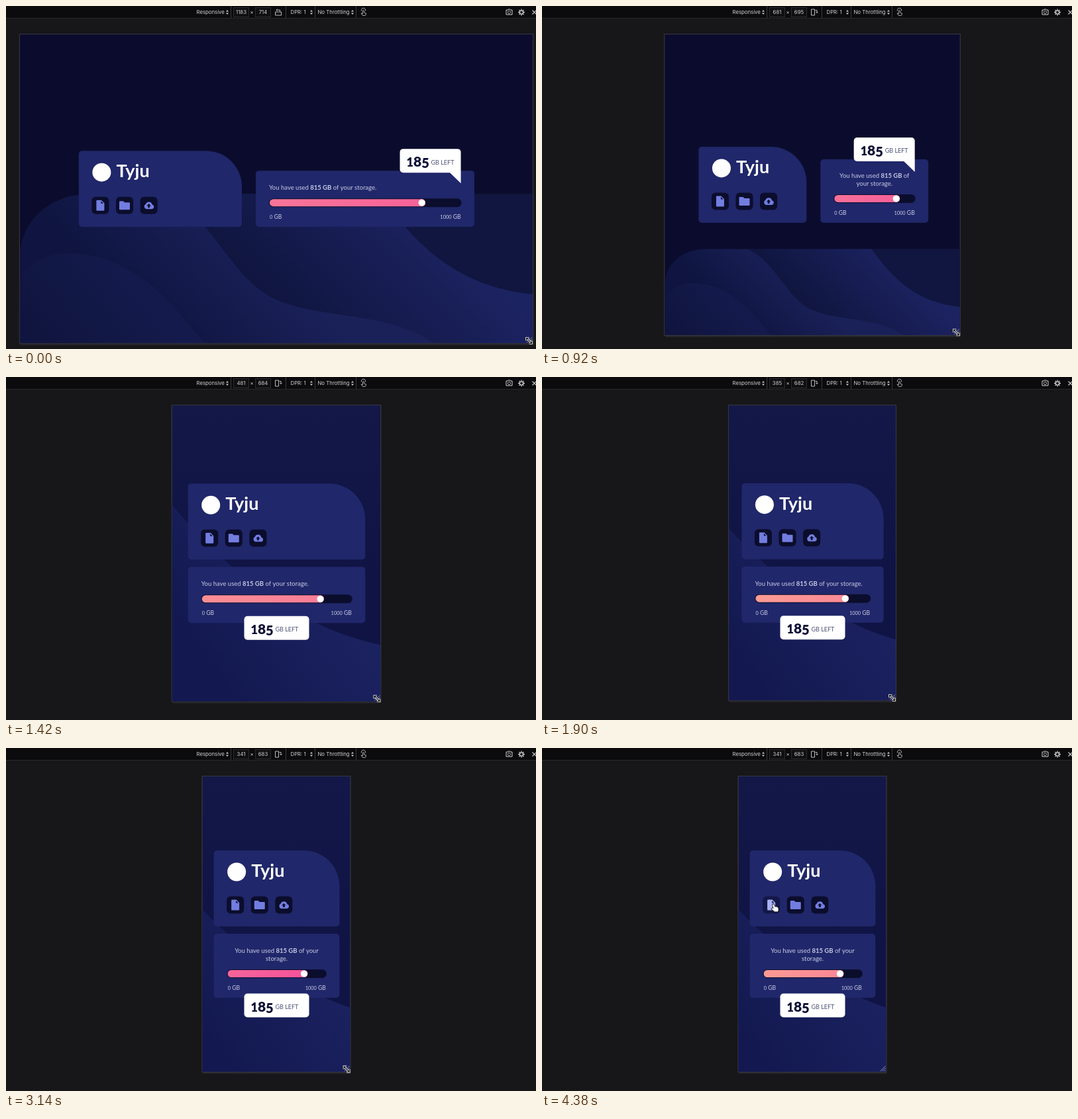
These frames come from a looping animation (800x519 px, 4.4 s). An HTML page with a canvas:

```html
<!DOCTYPE html>
<html lang="en">
<head>
<meta charset="utf-8">
<title>Responsive storage page</title>
<style>
html, body { margin: 0; height: 100%; overflow: hidden; background: #17171a; }
canvas { display: block; }
</style>
</head>
<body>
<canvas id="stage" width="800" height="519"></canvas>
<script>
const c = document.getElementById('stage').getContext('2d');
const LOOP = 4400, SCALE = 0.6545, CENTER = 408, TOP = 43;
const LATO = 'Lato, sans-serif', UI = '7.8px Inter, sans-serif';
const NAVY = '#0b0d2c', CARD = '#20276a', PALE = '#c9cce6', GREY = '#d0d0d4';

// time, viewport width, viewport height
const SIZES = [
  [0, 1183, 714], [60, 1183, 714], [460, 1013, 709], [560, 1013, 709],
  [920, 681, 695], [1080, 648, 692], [1420, 481, 684], [1640, 440, 683],
  [1900, 385, 682], [2180, 398, 682], [2720, 367, 683], [3000, 341, 683], [LOOP, 341, 683]
];

function sizeAt(t) {
  const i = SIZES.findIndex(k => k[0] > t), a = SIZES[i - 1], b = SIZES[i];
  const f = (t - a[0]) / (b[0] - a[0]);
  return [1, 2].map(n => Math.round(a[n] + (b[n] - a[n]) * f));
}

function text(str, x, y, font, color, align = 'left') {
  c.font = font;
  c.fillStyle = color;
  c.textAlign = align;
  c.fillText(str, x, y);
}

// Runs are [string, font, vertical shift]; align 0 = left, 0.5 = centre, 1 = right
function runs(list, x, y, color, align = 0) {
  const widths = list.map(([str, font]) => (c.font = font, c.measureText(str).width));
  x -= align * widths.reduce((a, b) => a + b, 0);
  list.forEach(([str, font, dy = 0], i) => {
    text(str, x, y + dy, font, color);
    x += widths[i];
  });
}

function box(x, y, w, h, r, fill) {
  c.beginPath();
  c.roundRect(x, y, w, h, r);
  c.fillStyle = fill;
  c.fill();
}

function fade(x0, y0, x1, y1, from, to) {
  const g = c.createLinearGradient(x0, y0, x1, y1);
  g.addColorStop(0, from);
  g.addColorStop(1, to);
  return g;
}

function shape(d, fill, x = 0, y = 0, stroke, width = 1) {
  const p = new Path2D(d);
  c.save();
  c.translate(x, y);
  if (stroke) { c.strokeStyle = stroke; c.lineWidth = width; c.stroke(p); }
  if (fill) { c.fillStyle = fill; c.fill(p); }
  c.restore();
}

function disc(x, y, r, fill) {
  c.beginPath();
  c.arc(x, y, r, 0, 7);
  c.fillStyle = fill;
  c.fill();
}

function toolbar(W, H) {
  box(0, 0, 800, 18, 0, '#0b0b0d');
  box(0, 18, 800, 1, 0, '#29292c');
  for (const x of [339, 422, 466, 528]) box(x, 0, 1, 18, 0, '#3a3a3e');
  for (const [x, n] of [[343.5, W], [376.5, H]]) {
    shape('M0 0H23V14H0Z', '#101012', x, 2.5, '#48484d', 1);
    text(n, x + 11.5, 12.4, UI, GREY, 'center');
  }
  text('Responsive', 287.5, 12.4, UI, GREY);
  text('×', 371, 12.4, UI, GREY, 'center');
  text('DPR: 1', 429.5, 12.4, UI, GREY);
  text('No Throttling', 470.5, 12.4, UI, GREY);
  for (const x of [334, 461, 523]) shape('M-2 -1L0 -3.5L2 -1ZM-2 1L0 3.5L2 1Z', GREY, x, 9.5);
  // rotate, touch, camera, gear, close
  if (W > H) shape('M-4.5 -.5H4.5V4.5H-4.5ZM-3 -3.5H2.5V-1M-1.5 -5L-3 -3.5L-1.5 -2', null, 411, 9.5, GREY, .9);
  else shape('M-4 -4.5H1V4.5H-4ZM2 -3H4.5V1M3 -.5L4.5 1L6 -.5', null, 410.5, 9.5, GREY, .9);
  shape('M-1 2V-2.5Q0 -4 1 -2.5V.5L4 1.5Q4 5 2 5H-1L-3.5 1.5ZM-3 -2A3.2 3.2 0 1 1 3 -2', null, 539.5, 9.5, GREY, .8);
  shape('M-4.5 -3H-2L-1.5 -4H1.5L2 -3H4.5V4H-4.5ZM2 .5A2 2 0 1 1 2 .4Z', null, 759.5, 9, GREY, 1);
  disc(778, 9.5, 3.3, GREY);
  for (let a = 0; a < 8; a++) {
    const x = Math.cos(a * Math.PI / 4), y = Math.sin(a * Math.PI / 4);
    shape(`M${x * 3} ${y * 3}L${x * 5} ${y * 5}`, null, 778, 9.5, GREY, 1.3);
  }
  disc(778, 9.5, 1.9, '#0b0b0d');
  shape('M-3 -3L3 3M3 -3L-3 3', null, 797.5, 9.5, GREY, 1.1);
}

function backdrop(x, w, h, mobile) {
  c.save();
  c.beginPath();
  c.rect(x, TOP, w, h);
  c.clip();
  if (mobile) {
    box(x, TOP, w, h, 0, fade(0, TOP, 0, 300, '#131848', '#101445'));
    shape('M-170 178C-80 290 40 395 200 412V519H-170Z',
      fade(-110, 420, 60, 300, '#131950', '#1b2260'), CENTER, 0);
  } else {
    box(x, TOP, w, h, 0, '#0b0c2d');
    c.translate(x, TOP + h);
    c.scale(w / 774, w / 774);
    c.translate(0, -226);
    const rim = 'V100C0 40 45 0 110 0';
    shape(`M0 226${rim}H774V226Z`, '#10163f');
    shape('M217 0H542C600 80 660 140 774 152V226H217Z', fade(230, 0, 405, -175, '#101640', '#1c2361'));
    shape(`M217 0C300 40 320 140 400 165C460 188 560 180 625 226H0${rim}Z`,
      fade(100, 100, 240, -40, '#0f1540', '#1a2159'));
    shape('M0 130C30 70 130 80 200 140C235 170 255 200 280 226H0Z',
      fade(20, 200, 140, 100, '#10153f', '#141a4b'));
  }
  c.restore();
}

const ICONS = [
  'M-6 -7Q-6 -8 -5 -8H1.5L6 -3.5V7Q6 8 5 8H-5Q-6 8 -6 7ZM1 -6.5V-3H4.7Z',
  'M-8 -5.5Q-8 -6.5 -7 -6.5H-2L0 -4.5H7Q8 -4.5 8 -3.5V5.5Q8 6.5 7 6.5H-7Q-8 6.5 -8 5.5Z',
  'M-4 5.5A4 4 0 0 1 -4.6 -2A5 5 0 0 1 5 -1.2A3.4 3.4 0 0 1 4.6 5.5ZM-1.3 3.5H1.3V.8H3.2L0 -2.6L-3.2 .8H-1.3Z'
];

function brandCard(x, y, w, hover) {
  box(x, y, w, 115, [5, 54, 5, 5], CARD);
  disc(x + 34.5, y + 32.5, 14, '#fff');
  text('Tyju', x + 56.5, y + 40, `bold 27px ${LATO}`, '#fff');
  ICONS.forEach((d, i) => {
    const cx = x + 32.5 + i * 36.6, cy = y + 82.5, on = hover(cx, cy);
    box(cx - 13, cy - 13, 26, 26, 6, on ? '#141848' : NAVY);
    c.fillStyle = on ? '#a9b2f4' : '#727de0';
    c.save();
    c.translate(cx, cy);
    c.fill(new Path2D(d), 'evenodd');
    c.restore();
  });
}

function storageCard(x, y, w, bottom, lines, pink) {
  box(x, y, w, bottom - y, 5, CARD);
  const body = `9.5px ${LATO}`, used = [['You have used ', body], ['815 GB', `bold ${body}`]];
  const mid = x + w / 2, base = bottom - 56;
  if (lines) {
    runs([...used, [lines[0], body]], mid, base - 12, PALE, .5);
    text(lines[1], mid, base, body, PALE, 'center');
  } else runs([...used, [' of your storage.', body]], x + 20, base, PALE);

  const bx = x + 20, bw = w - 39.5, by = bottom - 43, fill = (bw - 2) * .815;
  box(bx, by, bw, 13, 6.5, NAVY);
  const start = bx - pink * 3 * fill;
  box(bx + 1, by + 1, fill, 11, 5.5, fade(start, 0, start + 4 * fill, 0, '#fb9c94', '#f4529b'));
  disc(bx + fill - 4.5, by + 6.5, 5.3, '#f9c3d6');
  disc(bx + fill - 4.5, by + 6.5, 4.7, '#fff');

  // low figures beside full capitals
  const label = n => [[n, `7.4px ${LATO}`], [' GB', `8.6px ${LATO}`]];
  runs(label('0'), bx + 1, bottom - 12, PALE);
  runs(label('1000'), bx + bw - 1, bottom - 12, PALE, 1);
}

function badge(x, y, w, tail) {
  box(x, y, w, 36, tail ? [5, 5, 0, 5] : 5, '#fff');
  if (tail) shape('M-17 0H0V16.5Z', '#fff', x + w, y + 35.5);
  const big = size => `900 ${size}px ${LATO}`;
  runs([['1', big(18)], ['8', big(21)], ['5', big(20), 2]], x + 10, y + 27, '#0c0f36');
  text('GB LEFT', x + 47, y + 23.5, `9px ${LATO}`, '#4b4f78');
}

function resizeCursor(x, y) {
  const d = 'M-4 0V-4H0M4 0V4H0M-4 -4L4 4';
  shape(d, null, x, y, '#fff', 2.8);
  shape(d, null, x, y, '#111', 1.2);
}

function pointer(x, y, hand) {
  const d = hand
    ? 'M-3 -5Q-2 -6.5 -1 -5L.5 -1.5Q4 -2.5 5.5 .5Q6.5 3 5 5.5H0L-4.5 1.5Q-4 0 -1.5 1Z'
    : 'M0 0V11L2.6 8.6L4.3 12.3L6 11.5L4.4 8H8Z';
  shape(d, hand ? '#fff' : '#111', x, y, hand ? '#111' : '#fff', 1.6);
}

function draw(t) {
  const [W, H] = sizeAt(t), w = W * SCALE, h = H * SCALE;
  const x = CENTER - w / 2, bottom = TOP + h, middle = TOP + h / 2;
  const mobile = W < 600;
  const pink = (1 + Math.cos((t - 500) / 2700 * 2 * Math.PI)) / 2;

  const f = Math.min(1, Math.max(0, (t - 3300) / 900)), move = f * f * (3 - 2 * f);
  const mx = 516 - 165 * move, my = 486 - 244 * move;
  let hovering = false;
  const hover = (cx, cy) => {
    const on = Math.abs(mx - 5 - cx) < 13 && Math.abs(my - 5 - cy) < 13;
    hovering = hovering || on;
    return on;
  };

  box(0, 0, 800, 519, 0, '#17171a');
  toolbar(W, H);
  box(x - 1, TOP - 1, w + 2, h + 2, 0, '#37373f');
  box(x + 1, bottom + 1, w, 2, 0, '#26262a');
  backdrop(x, w, h, mobile);

  if (mobile) {
    const cw = w * .85, cx = CENTER + .5 - cw / 2, wrap = cw < 203;
    const total = wrap ? 223 : 211, y = middle - total / 2;
    brandCard(cx, y, cw, hover);
    storageCard(cx, y + 126, cw, y + total, wrap && [' of your', 'storage.'], pink);
    badge(CENTER - 48.5, y + total - (wrap ? 6.5 : 10.5), 98, false);
  } else {
    const lw = 163 + .253 * (w - 446), rw = 163 + .509 * (w - 446);
    const lx = x + w * .115, rx = lx + lw + 21, end = middle + 57.5;
    const wrap = rw < 203, y = end - (wrap ? 96 : 85);
    brandCard(lx, end - 115, lw, hover);
    storageCard(rx, y, rw, end, wrap && (rw < 168 ? [' of', 'your storage.'] : [' of your', 'storage.']), pink);
    badge(rx + rw - 112.5, y - 33, 92, true);
  }

  shape('M-8 0L0 -8M-5 0L0 -5M-2 0L0 -2', null, x + w - 1, bottom - 1, '#9a9ca8', .9);
  if (move) pointer(mx, my, hovering);
  else resizeCursor(x + w - 5.5, bottom - 4);
}

function tick() {
  draw(performance.now() % LOOP);
  requestAnimationFrame(tick);
}
tick();
</script>
</body>
</html>
```
